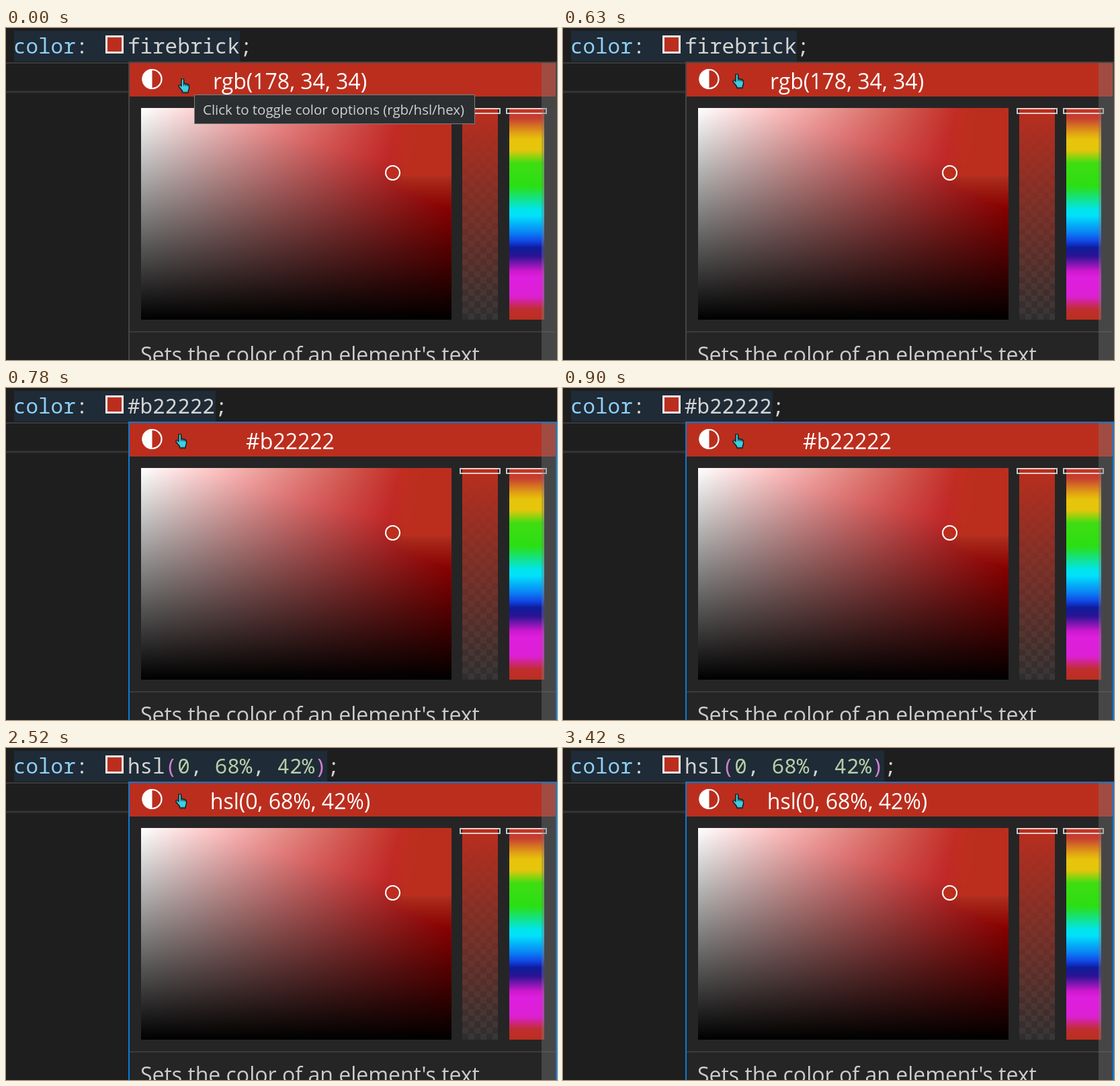
Write an HTML page with a canvas that moves like this. It is 820 by 494 pixels and loops after 3630 ms.

```html
<!DOCTYPE html>
<html lang="en">
<head>
<meta charset="utf-8">
<title>Color picker formats</title>
<style>
  html, body { margin: 0; width: 100%; height: 100%; overflow: hidden; background: #1e1e1e; }
  svg { display: block; width: 820px; height: 494px; }
  canvas { display: block; }
  text { white-space: pre; }
  .code { font: 30.9px "Noto Sans Mono", monospace; fill: #d4d4d4; }
  .ui { font: 32px "Open Sans", "Noto Sans", sans-serif; fill: #fff; }
  .title { text-anchor: middle; }
  .ui .about { fill: #ccc; }
  .ui.hint { font-size: 20.45px; fill: #d0d0d0; }
  .prop { fill: #8fd0f8; }
  .num { fill: #b5cea8; }
  .paren { fill: #cf7fd2; }
  .select { fill: #1f2b36; }
  .frame { fill: none; stroke: #454545; stroke-width: 2; }
  .handle { fill: none; stroke: #fff; stroke-opacity: .75; stroke-width: 2; }

  .tooltip, .cursor, .frame, .rgb, .hex, .hsl { animation: 3630ms step-end infinite; }
  .tooltip { animation-name: tooltip; }
  .cursor { animation-name: cursor; }
  .frame { animation-name: focus; }
  .rgb { animation-name: rgb; }
  .hex { animation-name: hex; }
  .hsl { animation-name: hsl; }

  @keyframes tooltip { 0% { visibility: visible; } .82%, 100% { visibility: hidden; } }
  @keyframes cursor {
    0% { transform: translate(256px, 74.5px); }
    6.61% { transform: translate(254px, 71px); }
    7.43%, 100% { transform: translate(252px, 67.5px); }
  }
  @keyframes focus {
    0%, 65.28% { stroke: #454545; }
    19%, 67.76%, 100% { stroke: #087bd6; }
  }
  @keyframes rgb { 0% { visibility: visible; } 19%, 100% { visibility: hidden; } }
  @keyframes hex { 0%, 67.76%, 100% { visibility: hidden; } 19% { visibility: visible; } }
  @keyframes hsl { 0% { visibility: hidden; } 67.76%, 100% { visibility: visible; } }
</style>
</head>
<body>
<svg viewBox="0 0 820 494">
  <defs>
    <linearGradient id="hue" x2="0" y2="1">
      <stop offset="0" stop-color="#bf3322"/>
      <stop offset=".05" stop-color="#c84030"/>
      <stop offset=".12" stop-color="#e2a414"/>
      <stop offset=".15" stop-color="#e8c40a"/>
      <stop offset=".20" stop-color="#e4c60c"/>
      <stop offset=".26" stop-color="#3fdd12"/>
      <stop offset=".37" stop-color="#2adf14"/>
      <stop offset=".48" stop-color="#00e5ec"/>
      <stop offset=".51" stop-color="#00e0fa"/>
      <stop offset=".59" stop-color="#0a80f5"/>
      <stop offset=".63" stop-color="#1145e2"/>
      <stop offset=".66" stop-color="#0e1c9a"/>
      <stop offset=".70" stop-color="#2a1494"/>
      <stop offset=".77" stop-color="#cc18cc"/>
      <stop offset=".80" stop-color="#de1ede"/>
      <stop offset=".89" stop-color="#dc20d4"/>
      <stop offset=".95" stop-color="#c02d30"/>
      <stop offset="1" stop-color="#bb2e1e"/>
    </linearGradient>
    <linearGradient id="fade" x2="0" y2="1">
      <stop offset="0" stop-color="#bb2e1e"/>
      <stop offset="1" stop-color="#bb2e1e" stop-opacity="0"/>
    </linearGradient>
    <pattern id="checker" x="679" y="119" width="18" height="18" patternUnits="userSpaceOnUse">
      <path d="M0 0h18v18H0z" fill="#373737"/>
      <path d="M0 0h9v18h9V9H0z" fill="#2e2e2e"/>
    </pattern>
  </defs>

  <!-- editor -->
  <path d="M0 52h182" stroke="#3a3a3a" stroke-width="2"/>
  <path d="M0 95h182" stroke="#343434" stroke-width="3"/>
  <path class="select rgb" d="M12 4h336v46H12z"/>
  <path class="select hex" d="M12 4h300v46H12z"/>
  <path class="select hsl" d="M12 4h466v46H12z"/>
  <g class="code">
    <text x="11" y="38"><tspan class="prop">color</tspan>:</text>
    <text class="rgb" x="181" y="38">firebrick;</text>
    <text class="hex" x="181" y="38">#b22222;</text>
    <text class="hsl" x="181" y="38">hsl<tspan class="paren">(</tspan><tspan class="num">0</tspan>, <tspan class="num">68%</tspan>, <tspan class="num">42%</tspan><tspan class="paren">)</tspan>;</text>
  </g>
  <rect x="149.5" y="12.5" width="24" height="24" fill="#bb2e1e" stroke="#eee" stroke-width="3"/>

  <!-- picker -->
  <path d="M183 51h636v443H183z" fill="#252526"/>
  <path d="M184 52h634v50H184z" fill="#bb2e1e"/>
  <circle cx="217.5" cy="76" r="14" fill="none" stroke="#fff" stroke-width="2.2"/>
  <path d="M217.5 61a15 15 0 0 0 0 30z" fill="#fff"/>
  <g class="ui">
    <g class="title">
      <text class="rgb" x="422.5" y="91">rgb(178, 34, 34)</text>
      <text class="hex" x="423" y="91">#b22222</text>
      <text class="hsl" x="423" y="91">hsl(0, 68%, 42%)</text>
    </g>
    <text class="about" x="200" y="498">Sets the color of an element's text</text>
  </g>
  <foreignObject x="201" y="119" width="462" height="315">
    <canvas width="462" height="315"></canvas>
  </foreignObject>
  <circle cx="575.5" cy="215.5" r="10.5" fill="#bb2e1e" stroke="#fff" stroke-width="2"/>
  <path d="M679 119h53v315h-53z" fill="url(#checker)"/>
  <path d="M679 119h53v315h-53z" fill="url(#fade)"/>
  <path d="M749 119h52v315h-52z" fill="url(#hue)"/>
  <path class="handle" d="M676 120h59v7h-59zM745 120h59v7h-59z"/>
  <path d="M184 452h634" stroke="#3b3b3b" stroke-width="2"/>
  <path d="M797 52h21v442h-21z" fill="#797979" fill-opacity=".4"/>
  <path class="frame" d="M183 496V51h636v445"/>

  <g class="tooltip">
    <path d="M280.5 99.5h417v43h-417z" fill="#2b2f31" stroke="#7d8182"/>
    <text class="ui hint" x="293" y="129">Click to toggle color options (rgb/hsl/hex)</text>
  </g>
  <g class="cursor" stroke="#0b1a1e" stroke-width="1.4" stroke-linejoin="round">
    <path fill="#3fcfe2" d="M5 2.5a1.8 1.8 0 0 1 3.6 0V8l5.5 1.2q2.4.6 2.4 3V15q0 2-1.2 3.5V21.5H6.5v-2.2L1.3 13q-1-1.5.3-2.3t2.4.3l1 1z"/>
    <path fill="none" stroke-width="1" d="M8.6 8v3.5M11.3 8.8v3M14 9.5v2.7"/>
  </g>
</svg>
<script>
  const canvas = document.querySelector("canvas");
  const { width, height } = canvas;
  const ctx = canvas.getContext("2d");
  const image = ctx.createImageData(width, height);

  const clamp = (n) => Math.min(1, Math.max(0, n));

  // Saturation runs across, value runs down; vivid reds settle on brick.
  function shade(sat, value) {
    const red = 255 * value;
    const rest = red * (1 - sat);
    const capped = Math.min(red, Math.max(187, 178 + 0.37 * rest));
    const excess = red - capped;
    const brick = clamp((value - 0.52) / 0.16) * clamp((sat - 0.5) / 0.35);
    const green = Math.max(rest + 0.25 * excess * (1 - sat), 46 * brick);
    const blue = Math.max(rest - 0.1 * excess, 30 * brick);
    return [Math.max(capped, 187 * clamp((value - 0.52) / 0.16) * brick), green, blue, 255];
  }

  for (let y = 0; y < height; y++) {
    for (let x = 0; x < width; x++) {
      image.data.set(shade(x / (width - 1), 1 - y / (height - 1)), (y * width + x) * 4);
    }
  }
  ctx.putImageData(image, 0, 0);
</script>
</body>
</html>
```
